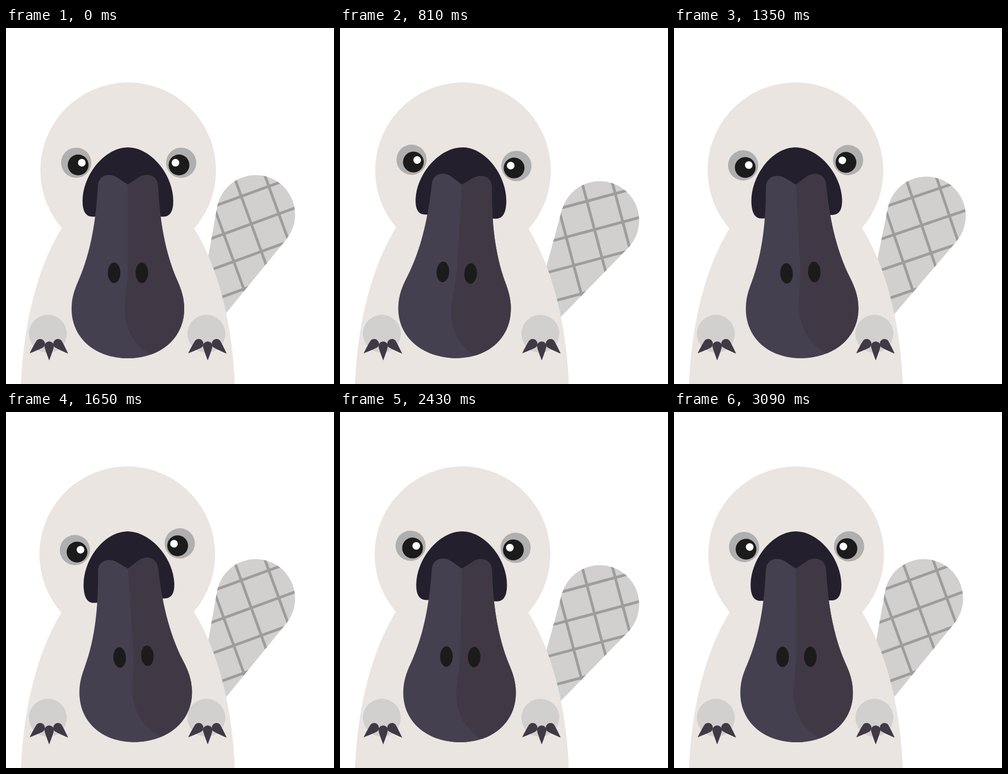
Recreate the animation shown at these times as an HTML page. Size 600 px wide and 650 px high, loop 3.12 s.

```html
<!DOCTYPE html>
<html lang="en">
<head>
<meta charset="utf-8">
<title>Platypus</title>
<style>
html, body { margin: 0; width: 100%; height: 100%; overflow: hidden; background: #fff; }
svg { display: block; width: 600px; height: 650px; }
</style>
</head>
<body>
<svg viewBox="0 0 600 650">
  <defs>
    <path id="tailShape" d="M337 601L386.2 326.6A72 72 0 1 1 513 385.6Z"/>
    <path id="billShape" d="M223 286L202 272C189 264 169 268 168 288C165 345 157 405 133 460C124 480 120 495 120 513C120 565 162 603 223 603S326 565 326 513C326 495 322 480 313 460C289 405 281 345 278 288C277 268 257 264 244 272Z"/>
    <clipPath id="tailClip"><use href="#tailShape"/></clipPath>
    <clipPath id="billClip"><use href="#billShape"/></clipPath>
    <path id="claw" d="M-8.7 0A8.7 8.7 0 0 1 8.7 0Q8 5 0 26Q-8 5 -8.7 0Z"/>
    <g id="paw">
      <circle cx="76.5" cy="558.3" r="34.7" fill="#d1d0ce"/>
      <g fill="#403845">
        <use href="#claw" transform="translate(62.5 576.5) rotate(48)"/>
        <use href="#claw" transform="translate(95 576.5) rotate(-46)"/>
        <use href="#claw" transform="translate(79 581)"/>
      </g>
    </g>
  </defs>

  <g id="tail">
    <use href="#tailShape" fill="#d1d0ce"/>
    <path clip-path="url(#tailClip)" fill="none" stroke="#9d9d9d" stroke-width="5"
      d="M359 268l82 225M416 268l82 225M473 268l82 225M370 329.4l170-62M370 386.4l170-62M370 443.4l170-62M370 500.4l170-62"/>
  </g>

  <ellipse cx="223" cy="680" rx="196" ry="400" fill="#eae5e1"/>
  <use href="#paw"/>
  <use href="#paw" x="290"/>

  <g id="head">
    <circle cx="223.5" cy="260" r="160.7" fill="#eae5e1"/>
    <g fill="#afafaf">
      <circle cx="128.4" cy="246" r="27.6"/>
      <circle cx="320.5" cy="246" r="27.6"/>
    </g>
    <g fill="#1b1b1b">
      <circle cx="132" cy="250" r="19"/>
      <circle cx="316.5" cy="250" r="19"/>
    </g>
    <g fill="#fff">
      <circle cx="138.7" cy="246" r="7"/>
      <circle cx="310" cy="246" r="7"/>
    </g>
    <path fill="#241f2c" d="M223 218C181 218 140 268 140 316Q140 344.5 158 344.5H288Q306 344.5 306 316C306 268 265 218 223 218Z"/>
    <ellipse cx="223" cy="520" rx="96" ry="83" fill="#29252c"/>
    <g id="bill">
      <use href="#billShape" fill="#454050"/>
      <path clip-path="url(#billClip)" fill="#403945" d="M223 250H340V620H290L265 597C235 580 217 550 217 513C217 490 223 470 223 430Z"/>
      <g fill="#1b1b1b">
        <ellipse cx="197.7" cy="447" rx="11.5" ry="18.7"/>
        <ellipse cx="248.5" cy="447" rx="11.5" ry="18.7"/>
      </g>
    </g>
  </g>
</svg>
<script>
const LOOP = 3120;
const part = id => document.getElementById(id);
const tail = part('tail'), head = part('head'), bill = part('bill');

// [time, angle] turning points, joined by cosine easing
const tailKeys = [[0, 0], [805, 5.1], [1630, 0], [2425, 5.1], [3110, 0], [3120, 0]];
const headKeys = [[0, 0], [700, 3.7], [1565, -4], [2175, 4], [2795, -4], [3420, 4]];

function swing(keys, t) {
  const i = keys.findIndex(k => k[0] > t);
  const [t0, a] = keys[i - 1], [t1, b] = keys[i];
  return a + (b - a) * (1 - Math.cos(Math.PI * (t - t0) / (t1 - t0))) / 2;
}

// the upper bill lifts once per loop
function squash(t) {
  const p = (t - 120) / 600;
  return p > 0 && p < 1 ? 1 - 0.07 * Math.sin(Math.PI * p) ** 2 : 1;
}

function draw() {
  const t = performance.now() % LOOP;
  tail.setAttribute('transform', `rotate(${swing(tailKeys, t)} 342 552)`);
  head.setAttribute('transform', `rotate(${swing(headKeys, t)} 223 286)`);
  bill.setAttribute('transform', `translate(0 286) scale(1 ${squash(t)}) translate(0 -286)`);
  requestAnimationFrame(draw);
}
draw();
</script>
</body>
</html>
```
